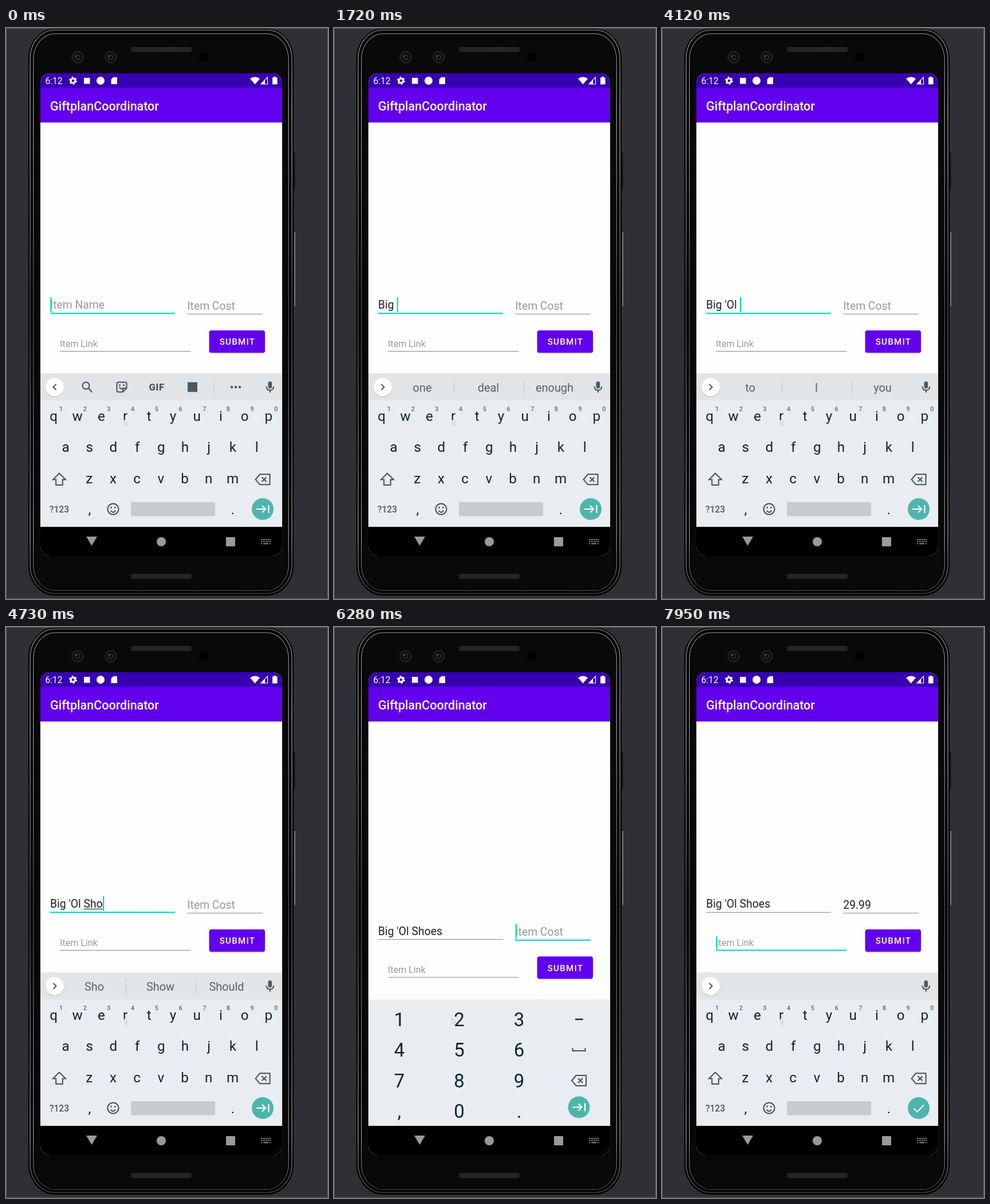
Recreate the animation shown at these times as an HTML page. Size 562 by 997 pixels, loop 8000 ms.

```html
<!DOCTYPE html>
<html lang="en">
<head>
<meta charset="utf-8">
<title>Gift form</title>
<style>
html, body { margin: 0; width: 100%; height: 100%; overflow: hidden; background: #2f3035; }
svg { display: block; width: 562px; height: 997px; font-family: Roboto, sans-serif; }
text { white-space: pre; }
.field { font-size: 19.34px; }
.value { fill: #202020; }
.hint { fill: #999; }
.key { font-size: 24.2px; fill: #0c2531; text-anchor: middle; }
.digit { font-size: 33px; fill: #0c2531; text-anchor: middle; }
.sup { font-size: 10.8px; font-weight: 500; fill: #5b686f; text-anchor: middle; }
.word { font-size: 19.9px; fill: #56636b; text-anchor: middle; }
.line { fill: none; stroke: #42535b; stroke-width: 2; }
.solid { fill: #4a5a62; }
.off { display: none; }
</style>
</head>
<body>
<svg viewBox="0 0 562 997">
  <defs>
    <clipPath id="screen"><rect x="60" y="79" width="422" height="843" rx="17"/></clipPath>
    <pattern id="mesh" width="3" height="3" patternUnits="userSpaceOnUse">
      <rect width="3" height="3" fill="#202020"/><circle cx="1.5" cy="1.5" r=".8" fill="#363636"/>
    </pattern>
    <linearGradient id="rim" x2="0" y2="1">
      <stop offset="0" stop-color="#6b6d6f"/><stop offset=".15" stop-color="#909294"/>
      <stop offset=".5" stop-color="#4b4c4e"/><stop offset=".9" stop-color="#88898b"/>
      <stop offset="1" stop-color="#3c3d3e"/>
    </linearGradient>
    <g id="erase">
      <path class="line" d="M-12.5 0L-5-9H12.5V9H-5ZM-1.5-4L6.5 4M6.5-4L-1.5 4"/>
    </g>
    <g id="next">
      <circle r="19" fill="#4db6ac"/>
      <path d="M-11 0H5M-1-6L5 0L-1 6M10.5-7V7" fill="none" stroke="#fff" stroke-width="2.2"/>
    </g>
  </defs>

  <rect width="562" height="997" fill="#2f3035"/>
  <path d="M.5 997V.5H561.5V997" fill="none" stroke="#66676a"/>
  <path d="M0 996H562" stroke="#46474a" stroke-width="2"/>

  <!-- phone body -->
  <rect x="500" y="217" width="5" height="66" rx="2" fill="#101011" stroke="#3b3c3e" stroke-width=".7"/>
  <rect x="500" y="354" width="5" height="133" rx="2" fill="#17181a"/>
  <path d="M504 356V486" stroke="#96989a" stroke-width="1.5"/>
  <rect x="40" y="2" width="461" height="988" rx="45" ry="52" fill="#050505" stroke="#000" stroke-width="2"/>
  <rect x="42" y="3.5" width="457" height="984" rx="43" ry="50" fill="none" stroke="url(#rim)" stroke-width="1.5"/>
  <rect x="48" y="10" width="445" height="972" rx="38" ry="44" fill="#090909" stroke="url(#rim)" stroke-width="1.4"/>
  <rect x="50" y="12" width="441" height="968" rx="36" ry="42" fill="#090909" stroke="#000" stroke-width="2"/>
  <rect x="218" y="33" width="106" height="9" rx="4" fill="url(#mesh)"/>
  <rect x="218" y="953" width="106" height="9" rx="4" fill="url(#mesh)"/>
  <g id="lenses"></g>
  <circle cx="345" cy="51" r="8" fill="#000"/>

  <g clip-path="url(#screen)">
    <rect x="60" y="79" width="422" height="843" fill="#fefefe"/>
    <rect x="60" y="79" width="422" height="26" fill="#3700b3"/>
    <rect x="60" y="104.5" width="422" height="60.5" fill="#6200ee"/>
    <g fill="#fff">
      <text x="68.5" y="98" font-size="15.6">6:12</text>
      <circle cx="117" cy="92" r="3.8" fill="none" stroke="#fff" stroke-width="3"/>
      <circle cx="117" cy="92" r="6" fill="none" stroke="#fff" stroke-width="2" stroke-dasharray="3.14"/>
      <rect x="136" y="87" width="10.5" height="10.5"/>
      <circle cx="165" cy="92" r="7"/>
      <path d="M187 86H194V98H183.500V90Z"/>
      <path d="M426 88.500Q434.500 82.500 443 88.500L434.500 98.500Z"/>
      <path d="M456.500 86V98H445Z" fill="none" stroke="#fff" stroke-width="1.2"/>
      <path d="M452 91V98H445Z"/>
      <path d="M467 85H471V86.500H473.500V98.500H465V86.500H467Z"/>
      <text x="77" y="143.500" font-size="21.5" font-weight="500">GiftplanCoordinator</text>
    </g>

    <g id="form">
      <g id="fields"></g>
      <rect x="355" y="530" width="97" height="39" rx="4" fill="#000" opacity=".14"/>
      <rect x="354.500" y="528" width="97.500" height="39" rx="4" fill="#6200ee"/>
      <text x="404" y="553.300" font-size="15" font-weight="500" letter-spacing="1.34" text-anchor="middle" fill="#fff">SUBMIT</text>
    </g>

    <g id="letters">
      <rect x="60" y="603" width="422" height="48" fill="#e1e5e8"/>
      <rect x="60" y="650.500" width="422" height="221" fill="#e9edf1"/>
      <circle cx="85" cy="628" r="16.500" fill="#000" opacity=".12"/>
      <circle cx="85" cy="627" r="16" fill="#fff"/>
      <path id="chevron" class="line"/>
      <g id="tools">
        <path class="line" d="M144 629L150 636"/>
        <circle class="line" cx="139.500" cy="624.500" r="6"/>
        <path class="line" d="M196 618.500H208Q210.500 618.500 210.500 621V629L204 635.500H196Q193.500 635.500 193.500 633V621Q193.500 618.500 196 618.500ZM204 635V629H210M197.500 627Q200 631 204 629" stroke-width="1.8"/>
        <path class="solid" d="M197 622.500h3v2.500h-3zM204 622.500h3v2.500h-3z"/>
        <text x="263" y="632.700" font-size="16.500" font-weight="900" letter-spacing=".6" text-anchor="middle" class="solid">GIF</text>
        <rect class="solid" x="317" y="618.500" width="17" height="17"/>
        <path d="M363 614V639" stroke="#c8cdd1"/>
        <g class="solid"><circle cx="394" cy="627" r="2.200"/><circle cx="401" cy="627" r="2.200"/><circle cx="408" cy="627" r="2.200"/></g>
      </g>
      <g id="words">
        <path d="M209 614V640M331.500 614V640" stroke="#c6cbcf"/>
        <text class="word" x="154" y="634.500"></text>
        <text class="word" x="269.500" y="634.500"></text>
        <text class="word" x="385" y="634.500"></text>
      </g>
      <rect class="solid" x="457.500" y="617" width="6.500" height="12.500" rx="3.200"/>
      <path class="line" d="M454.500 626Q454.500 632.500 460.800 632.500T467 626M460.800 632V636.500" stroke-width="1.800"/>
      <g id="rows"></g>
      <path class="line" d="M93 777.500L104 788.500H98.800V798H87.200V788.500H82Z"/>
      <use href="#erase" x="448" y="788.300"/>
      <text x="93" y="845.800" font-size="15.600" font-weight="500" text-anchor="middle" class="solid">?123</text>
      <circle class="line" cx="187" cy="840" r="9.600"/>
      <path class="line" d="M182.500 842.500Q187 848.500 191.500 842.500"/>
      <g class="solid"><circle cx="183.600" cy="837.300" r="1.500"/><circle cx="190.400" cy="837.300" r="1.500"/></g>
      <rect x="218" y="828" width="147" height="24.500" rx="3" fill="#c7cbcf"/>
      <use id="tab" href="#next" x="448" y="840"/>
      <g id="done"><circle cx="448" cy="840" r="19" fill="#4db6ac"/><path d="M439.500 840.500L445.500 846.500L457 834.500" fill="none" stroke="#fff" stroke-width="2.200"/></g>
    </g>

    <g id="numbers">
      <rect x="60" y="650.500" width="422" height="221" fill="#e9edf1"/>
      <path d="M421 685H434.500" stroke="#0c2531" stroke-width="2.500"/>
      <path class="line" d="M416.500 735V740H438.500V735"/>
      <use href="#erase" x="427.500" y="792"/>
      <use href="#next" x="427.500" y="838.500"/>
    </g>

    <!-- pointer -->
    <path d="M205.500 683L212 689L209 689.500L211 694L208.500 694L207 690.500Z" fill="#f4f6f8" stroke="#8d9499" stroke-width=".8" stroke-dasharray="1.500 1"/>

    <rect x="60" y="871" width="422" height="51" fill="#000"/>
    <g fill="#9a9a9a">
      <path d="M140 888H159L149.500 904Z"/>
      <circle cx="271" cy="897" r="8"/>
      <rect x="384" y="889" width="16" height="16" rx="1"/>
      <path d="M445 893H462M445 896.500H462" stroke="#9a9a9a" stroke-width="1.800" stroke-dasharray="1.800 1.200"/>
      <path d="M445 900.300H447M449 900.300H458M460 900.300H462" stroke="#9a9a9a" stroke-width="1.800"/>
    </g>
  </g>
</svg>
<script>
const $ = id => document.getElementById(id);

function add(parent, tag, attrs, text = '') {
  const el = document.createElementNS('http://www.w3.org/2000/svg', tag);
  for (const k in attrs) el.setAttribute(k, attrs[k]);
  el.textContent = text;
  return parent.appendChild(el);
}
const show = (el, on) => el.classList.toggle('off', !on);

// camera lenses
for (const x of [125, 183]) {
  for (const [r, fill] of [[11, '#1e1f20'], [8, '#0c0d0e'], [5, '#25282a'], [2.5, '#0b0d0f']])
    add($('lenses'), 'circle', { cx: x, cy: 51, r, fill });
  add($('lenses'), 'circle', { cx: x - 3, cy: 49, r: 1.2, fill: '#6b7175' });
}

// keys
const STEP = 41.7;
const row = (chars, x, y) => [...chars].forEach((c, i) =>
  add($('rows'), 'text', { class: 'key', x: x + i * STEP, y }, c));
row('qwertyuiop', 83, 686);
row('asdfghjkl', 104, 740);
row('zxcvbnm', 145.3, 794.5);
row(',', 146, 848.5);
row('.', 396, 848.5);
[...'1234567890'].forEach((c, i) =>
  add($('rows'), 'text', { class: 'sup', x: 96 + i * STEP, y: 668.5 }, c));
['123', '456', '789', ',0.'].forEach((keys, r) => [...keys].forEach((c, i) =>
  add($('numbers'), 'text', { class: 'digit', x: 114 + i * 104.5, y: 697 + r * 53.4 }, c)));

// form fields
function makeField(hint, x, right, base, lineY, caret, size) {
  const g = $('fields');
  const style = `font-size:${size}px`;
  return {
    x,
    hint: add(g, 'text', { class: 'field hint', x, y: base, style }, hint),
    value: add(g, 'text', { class: 'field value', x, y: base, style }),
    under: add(g, 'rect', { x, y: base + 1.6, height: 1.1, fill: '#202020' }),
    rule: add(g, 'rect', { x, width: right - x }),
    caret: add(g, 'rect', { y: caret[0], width: 2.2, height: caret[1], fill: '#03dac5' }),
    lineY
  };
}
const fields = {
  name: makeField('Item Name', 77, 295, 490.3, 498.3, [470, 26], 19.34),
  cost: makeField('Item Cost', 316.3, 447.5, 491.8, 499.5, [471, 26.5], 19.34),
  link: makeField('Item Link', 94, 322, 556.8, 564.5, [540, 22.5], 16.1)
};

function drawField(key, s) {
  const f = fields[key], text = s[key] || '', active = s.focus === key;
  f.value.textContent = text;
  show(f.hint, !text);
  const widthOf = n => n ? f.value.getSubStringLength(0, n) : 0;
  const end = widthOf(text.length);
  const composing = key === 'name' ? s.composing : 0;
  const start = widthOf(text.length - composing);
  f.under.setAttribute('x', f.x + start);
  f.under.setAttribute('width', end - start);
  f.caret.setAttribute('x', f.x + .3 + end);
  show(f.caret, active && s.caret);
  const h = active ? 2.2 : 1;
  f.rule.setAttribute('y', f.lineY - h / 2);
  f.rule.setAttribute('height', h);
  f.rule.setAttribute('fill', active ? '#03dac5' : '#858585');
}

// each step changes only what it lists; typing always shows the caret
const type = (name, composing, words) => ({ name, composing, words, tools: 0, back: 0, caret: 1 });
const big = type('Big ', 0, 'one deal enough');
const steps = [
  [0, { name: '', cost: '', composing: 0, words: '', tools: 1, back: 1, focus: 'name', pad: 0, caret: 1, done: 0 }],
  [460, { caret: 0 }],
  [1140, type('B', 1, 'B Be But')],
  [1290, type('Bi', 2, 'Bi Big Bit')],
  [1440, type('Big', 3, 'Big Bigger Bigfoot')],
  [1720, big],
  [1990, type('Big O', 1, 'O Of One')],
  [2520, { caret: 0 }],
  [2950, big],
  [3230, { name: "Big '", words: '', tools: .5 }],
  [3380, { name: "Big 'O", tools: 1, back: 1 }],
  [3870, { name: "Big 'Ol" }],
  [4120, type("Big 'Ol ", 0, 'to I you')],
  [4430, type("Big 'Ol S", 1, 'S So She')],
  [4580, type("Big 'Ol Sh", 2, 'Sh She Should')],
  [4730, type("Big 'Ol Sho", 3, 'Sho Show Should')],
  [4850, type("Big 'Ol Shoe", 4, 'Shoe Shoes Show')],
  [5000, type("Big 'Ol Shoes", 5, "Shoes Shoe's Shows")],
  [5300, { composing: 0, focus: 'cost' }],
  [5420, { pad: 1 }],
  [5850, { caret: 0 }],
  [6280, { caret: 1 }],
  [6430, { cost: '29' }],
  [6710, { cost: '29.' }],
  [7270, { cost: '29.9' }],
  [7420, { cost: '29.99' }],
  [7950, { pad: 0, focus: 'link', words: '', done: 1 }]
];

function draw(s) {
  for (const key in fields) drawField(key, s);
  $('form').setAttribute('transform', `translate(0 ${s.pad ? 47.3 : 0})`);
  show($('letters'), !s.pad);
  show($('numbers'), s.pad);
  show($('done'), s.done);
  show($('tab'), !s.done);
  $('tools').setAttribute('opacity', s.tools);
  show($('words'), s.words);
  const words = s.words.split(' ');
  $('words').querySelectorAll('text').forEach((el, i) => el.textContent = words[i] || '');
  $('chevron').setAttribute('d', s.back ? 'M87.5 622L82.500 627L87.500 632' : 'M82.500 622L87.500 627L82.500 632');
}

const LOOP = 8000;
let shown = -1, origin = null;
function tick(now) {
  origin ??= now;
  const t = (now - origin) % LOOP;
  const count = steps.filter(([at]) => at <= t).length;
  if (count !== shown) {
    shown = count;
    draw(Object.assign({}, ...steps.slice(0, count).map(step => step[1])));
  }
  requestAnimationFrame(tick);
}
requestAnimationFrame(tick);
</script>
</body>
</html>
```
